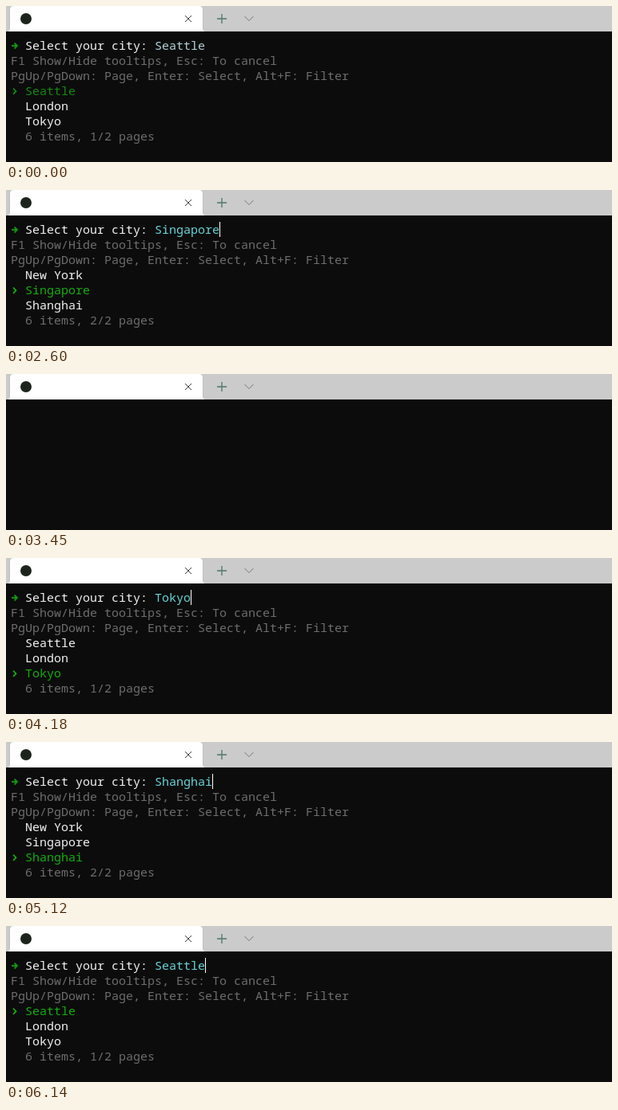
Recreate the animation shown at these times as an HTML page. Size 758x196 px, loop 8 s.

```html
<!DOCTYPE html>
<html lang="en">
<head>
<meta charset="utf-8">
<title>City selection prompt</title>
<style>
  html, body { margin: 0; width: 100%; height: 100%; overflow: hidden; background: #0c0c0c; }
  svg { display: block; }
  text { font: 500 15px "Noto Sans Mono", "DejaVu Sans Mono", monospace; fill: #f2f2f2; white-space: pre; }
  .hint { fill: #6d6d6d; }
  .bar path { fill: none; stroke: #666; }
  .mark { fill: none; stroke: #13930f; stroke-width: 1.8; }
</style>
</head>
<body>
<svg width="758" height="196" viewBox="0 0 758 196">
  <rect width="758" height="196" fill="#0c0c0c"/>
  <g class="bar">
    <rect width="758" height="32" fill="#cbcbcb"/>
    <rect x="4" y="0" width="243" height="32" rx="6" fill="#b9c3be"/>
    <path d="M2 32Q5 32 5 28V5Q5 0 10 0H241Q246 0 246 5V28Q246 32 249 32Z" style="fill:#fff;stroke:none"/>
    <circle cx="25" cy="16" r="7" fill="#1c241c"/>
    <path d="M224 12l8 8m0-8l-8 8" style="stroke:#444"/>
    <path d="M264 16h12M270 10v12" style="stroke:#4d7767;stroke-width:1.3"/>
    <path d="M298.500 13l5.500 5.500 5.500-5.500" style="stroke:#777"/>
  </g>
  <g id="screen">
    <path class="mark" d="M7 50h7M10.500 46.500l3.500 3.500-3.500 3.500"/>
    <text x="24" y="55">Select your city:</text>
    <text id="answer" x="186" y="55"></text>
    <rect id="cursor" y="40" width="1" height="19" fill="#fff"/>
    <text class="hint" x="6" y="74">F1 Show/Hide tooltips, Esc: To cancel</text>
    <text class="hint" x="6" y="93">PgUp/PgDown: Page, Enter: Select, Alt+F: Filter</text>
    <path id="pointer" class="mark" d="M9 103.500l3.500 3.700-3.500 3.700"/>
    <text class="item" x="24" y="112"></text>
    <text class="item" x="24" y="131"></text>
    <text class="item" x="24" y="150"></text>
    <text id="pages" class="hint" x="24" y="169"></text>
  </g>
</svg>
<script>
const LOOP = 8000, BLANK = -1, CELL = 9, ROW = 19;
const cities = ["Seattle", "London", "Tokyo", "New York", "Singapore", "Shanghai"];

// [start in ms, selected city, cursor visible]
const steps = [
  [0, 0, false], [860, 0, true], [1860, 1, true], [2130, 2, true], [2330, 3, true], [2600, 4, true],
  [3200, BLANK], [3270, 5, true], [3450, BLANK], [3540, 0, true], [3870, 1, true], [4180, 2, true],
  [4380, 3, false], [4450, 3, true], [4780, BLANK], [4850, 2, true], [5120, 5, true],
  [5520, BLANK], [5590, 2, true], [5940, 3, true], [6140, 0, true]
];

const byId = id => document.getElementById(id);
const [screenBox, answer, cursor, pointer, pages] =
  ["screen", "answer", "cursor", "pointer", "pages"].map(byId);
const items = document.querySelectorAll(".item");
let shown;

function draw([start, selected, hasCursor]) {
  screenBox.style.display = selected === BLANK ? "none" : "";
  if (selected === BLANK) return;

  const idle = start < 1860;
  const green = idle ? "#138a10" : "#15ad0e";
  const page = Math.floor(selected / 3), row = selected % 3;

  answer.textContent = cities[selected];
  answer.style.fill = idle ? "#b4d3d9" : "#6bd3d6";
  cursor.style.display = hasCursor ? "" : "none";
  cursor.setAttribute("x", 186 + cities[selected].length * CELL + (cities[selected].length ? 0 : 1));
  pointer.setAttribute("transform", `translate(0 ${row * ROW})`);
  pointer.style.stroke = green;
  items.forEach((item, i) => {
    item.textContent = cities[page * 3 + i];
    item.style.fill = i === row ? green : "";
  });
  pages.textContent = `6 items, ${page + 1}/2 pages`;
}

function tick() {
  const t = performance.now() % LOOP;
  const step = steps.findLast(([start]) => start <= t);
  if (step !== shown) draw(shown = step);
  requestAnimationFrame(tick);
}
tick();
</script>
</body>
</html>
```
